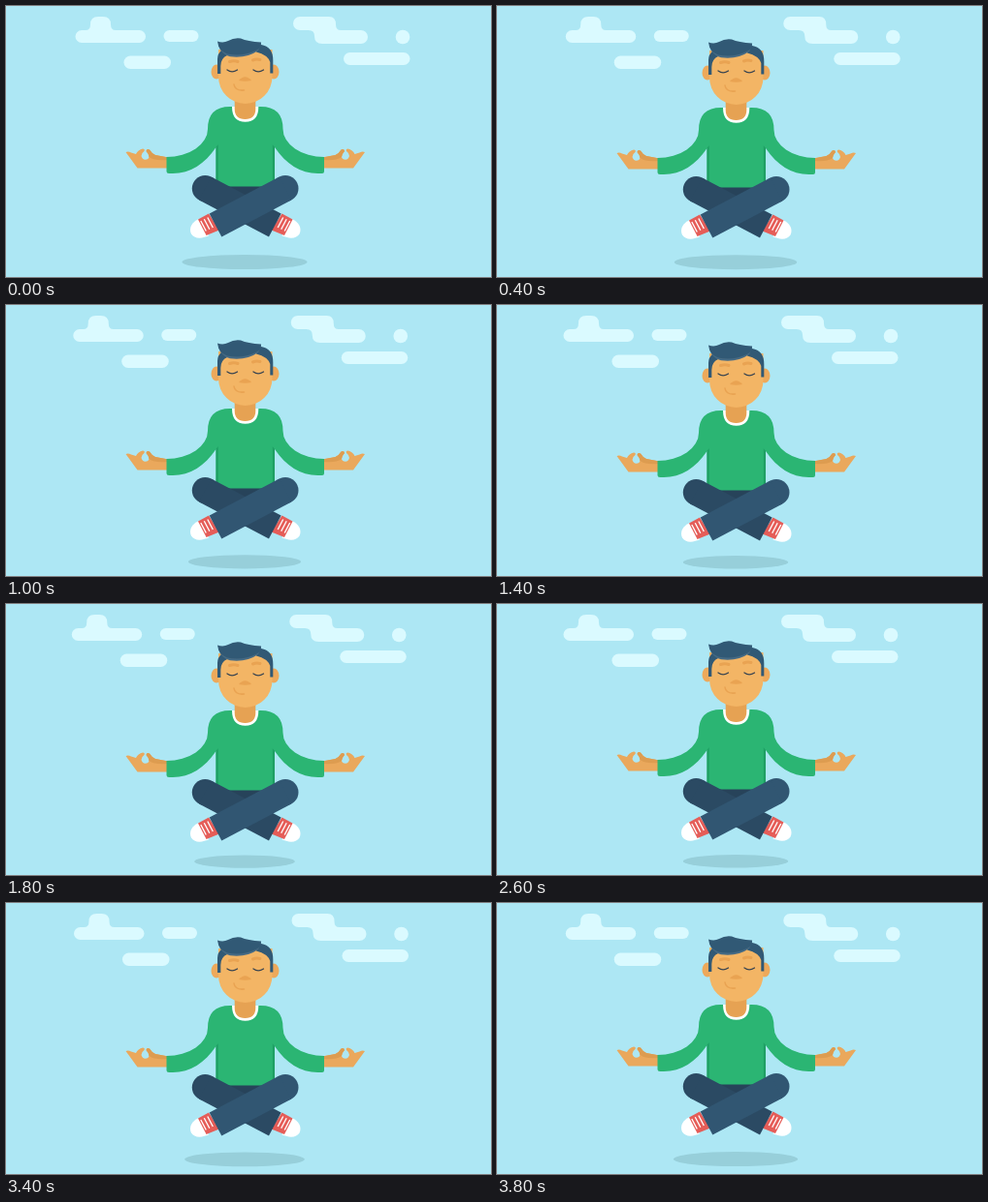
Recreate the animation shown at these times as an HTML page. Size 500 by 280 pixels, loop 4 s.

```html
<!DOCTYPE html>
<html lang="en">
<head>
<meta charset="utf-8">
<title>Floating meditation</title>
<style>
  html, body { margin: 0; height: 100%; overflow: hidden; background: #ade7f4; }
  svg { display: block; width: 500px; height: 280px; }
  .line { fill: none; stroke-linecap: round; }
</style>
</head>
<body>
<svg viewBox="0 0 500 280">
  <defs>
    <g id="hand">
      <path fill="#eaa85c" d="M123.500 151Q126 149.800 129 151.500L134 153Q136 148.500 141 147.500Q143.500 147.500 142.500 150Q139.500 152 139.500 155Q140.500 158.500 143.500 158.800Q147 158.500 147.500 156Q147 152.500 144.500 150Q145 147 148 148.500Q150 152 154 154L166 156.300V167.500H135.500Z"/>
      <path fill="#dd9c50" d="M144.500 150Q145 147 148 148.500Q150 152 154 154L166 156.300V159Q153 160 147.500 156Q147 152.500 144.500 150Z"/>
    </g>
    <g id="shoe">
      <path fill="#fff" d="M199 219.500C192 222 188 229 191 235Q194 240 202 239L209 237Z"/>
      <path fill="#e55d58" d="M198 220L209 214L220 231L206.500 236.500Z"/>
      <path stroke="#fff" stroke-width="1.300" d="M200.800 221.500l5.500 10.500M204.300 219.800l5.500 10.500M207.800 218l5.500 10.500"/>
    </g>
  </defs>

  <g id="clouds" fill="#dafaff">
    <path d="M78 25H82Q87 25 87 19Q87 11 95 11H100Q108 11 108 19Q108 25 113 25H137.500a6.500 6.500 0 0 1 0 13H78a6.500 6.500 0 0 1 0-13Z"/>
    <rect x="162.500" y="25" width="36" height="12" rx="6"/>
    <rect x="121.500" y="51.500" width="48.500" height="13.500" rx="6.700"/>
    <path d="M303 11H333Q340 11 340 19Q340 25 345 25H366a7 7 0 0 1 0 14H326Q318 39 318 31Q318 25 312 25H303a7 7 0 0 1 0-14Z"/>
    <circle cx="409" cy="32" r="7.300"/>
    <rect x="348" y="48" width="68.500" height="13" rx="6.500"/>
  </g>

  <ellipse id="shadow" cx="246" fill="#97cfda"/>

  <g id="body">
    <use href="#hand"/>
    <use href="#hand" transform="matrix(-1 0 0 1 493.500 0)"/>

    <!-- sweater -->
    <path fill="#2bb573" d="M231 104Q208 104 208 127A42.500 29 0 0 1 165.500 156V171Q165.500 173 168 173H172C190 173 205 163 216.500 146V188H277V146C288.500 163 303.500 173 321.500 173H326Q328 173 328 171V156A42.500 29 0 0 1 285.500 127Q285.500 104 262.500 104Z"/>
    <path fill="#1f9f64" d="M218.700 143V188H216.500V146ZM274.800 143V188H277V146Z"/>

    <!-- legs -->
    <g transform="translate(0 .5)">
      <use href="#shoe"/>
      <use href="#shoe" transform="matrix(-1 0 0 1 493.500 0)"/>
      <path fill="#27435a" d="M215 186H279L262 206H230Z"/>
      <g stroke="#2b4a63" fill="#2b4a63" stroke-width="27">
        <circle cx="205.300" cy="188" r="13.500" stroke="none"/>
        <path d="M205.300 188L277.300 226"/>
      </g>
      <g stroke="#315672" fill="#315672" stroke-width="27">
        <circle cx="288" cy="188" r="13.500" stroke="none"/>
        <path d="M288 188L216 226"/>
      </g>
    </g>

    <!-- neck -->
    <path fill="#fff" d="M233 104Q233 119.800 246.700 119.800Q260.300 119.800 260.300 104Z"/>
    <path fill="#e6a253" d="M235.700 92H257.300V106Q257.300 117 246.500 117Q235.700 117 235.700 106Z"/>

    <!-- head -->
    <g fill="#eda95b">
      <ellipse cx="217" cy="68" rx="5.500" ry="7.500"/>
      <ellipse cx="276" cy="68" rx="5.500" ry="7.500"/>
    </g>
    <path fill="#f3b565" d="M219 45H274.500V73a27.750 28 0 0 1-55.500 0Z"/>
    <path fill="#315975" d="M218 70V55Q218 49 223 45L228 51Q221.300 54 221.300 62V70ZM258 40H263Q275.300 42 275.300 56V69.500H272.300V58Q270 50.500 258 47.500Z"/>
    <path fill="#456a84" d="M219 41Q222 50 231 52.300Q248 54.500 260 46L263 40Z"/>
    <path fill="#315975" d="M218 36.500Q224 38.500 229 36Q235 32.500 242 33.500Q249 36.500 263 37.500Q263.500 43 258.500 45.500Q244 53 228 49.500Q219 46 218 36.500Z"/>
    <g class="line" stroke="#e9a352">
      <path stroke-width="3" d="M230.500 57.500Q235 56 239 57.500M254.500 56Q258 54.500 262 55.500"/>
      <path stroke-width="1.500" d="M235 81Q236 88 245.500 87"/>
    </g>
    <path fill="#e9a352" d="M240 77Q246.500 69.500 253 77Q246.500 78.500 240 77Z"/>
    <path class="line" stroke="#3a4550" stroke-width="1.300" d="M228 66Q233 69.800 238.500 66M255 66Q260 69.800 265.500 66"/>
  </g>
</svg>
<script>
  const LOOP = 4000, STEP = 200;
  const [clouds, shadow, body] = ['clouds', 'shadow', 'body'].map(id => document.getElementById(id));

  function draw(now) {
    const time = Math.floor((now % LOOP) / STEP) * STEP;
    // The lowest pose is held for three steps.
    const wave = Math.max(Math.cos(time / LOOP * 2 * Math.PI), -0.951);
    const fall = 1 - wave;
    // Whole steps keep the slow ends of the swing still.
    const snap = amount => Math.ceil(amount * fall);

    body.setAttribute('transform', `translate(0 ${snap(3)})`);
    clouds.setAttribute('transform', `translate(${-snap(2.5) * 0.75} 0)`);
    shadow.setAttribute('cy', 264.5 + fall * 0.8);
    shadow.setAttribute('rx', 58 + wave * 6.5);
    shadow.setAttribute('ry', 7.1 + wave * 0.5);
    requestAnimationFrame(draw);
  }
  draw(0);
</script>
</body>
</html>
```
